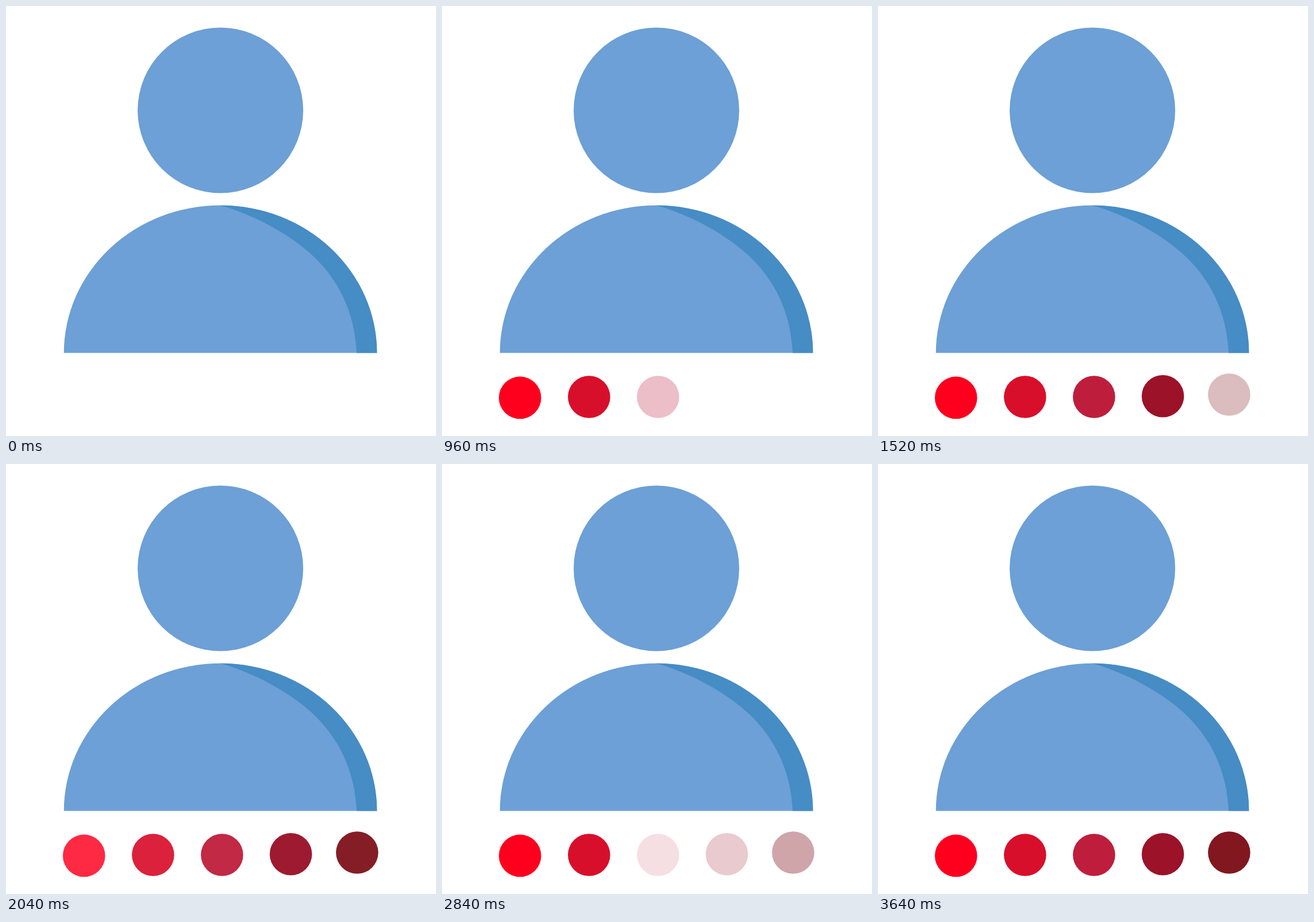
An HTML page with a canvas for the animation above (4000 ms loop, 748 by 748 pixels).

```html
<!DOCTYPE html>
<html lang="en">
<head>
<meta charset="utf-8">
<title>Loading dots</title>
<style>
  html, body { margin: 0; width: 100%; height: 100%; overflow: hidden; background: #fff; }
  canvas { display: block; width: 748px; height: 748px; }
</style>
</head>
<body>
<canvas id="stage" width="748" height="748"></canvas>
<script>
const ctx = document.getElementById('stage').getContext('2d');
const LOOP = 4000, STEP = 40, FADE = 280;
const LIGHT = '#6ca0d6', DARK = '#468cc5';
const dots = [
  { x: 135.7, y: 681.4, color: '#fe001e' },
  { x: 255.8, y: 680, color: '#d80f2b' },
  { x: 375.8, y: 680, color: '#be1e3c' },
  { x: 495.5, y: 678.7, color: '#9b1229' },
  { x: 610.8, y: 676, color: '#821720' }
];

const clamp = v => Math.min(1, Math.max(0, v));

// Dots appear one by one, then each dims until its turn to light up again.
function alphaAt(i, t) {
  if (t <= 2000) return clamp((t - 320 - FADE * i) / FADE);
  const low = 2240 + FADE * i;
  return t < low ? (low - t) / (low - 2000) : clamp((t - low) / FADE);
}

function disc(x, y, r, color) {
  ctx.fillStyle = color;
  ctx.beginPath();
  ctx.arc(x, y, r, 0, Math.PI * 2);
  ctx.fill();
}

function drawPerson() {
  disc(373, 181.5, 144, LIGHT);

  ctx.beginPath();
  ctx.ellipse(373, 603.5, 272.3, 256.7, 0, Math.PI, Math.PI * 2);
  ctx.fill();

  ctx.fillStyle = DARK;
  ctx.beginPath();
  ctx.ellipse(373, 603.5, 272.3, 256.7, 0, -Math.PI / 2, 0);
  ctx.lineTo(610, 603.5);
  ctx.bezierCurveTo(607, 535, 580, 476, 530, 431);
  ctx.bezierCurveTo(490, 395, 430, 363, 373, 346.8);
  ctx.fill();
}

function draw(now) {
  const t = Math.floor((now % LOOP) / STEP + 1e-6) * STEP;
  ctx.fillStyle = '#fff';
  ctx.fillRect(0, 0, 748, 748);
  drawPerson();
  dots.forEach((d, i) => {
    ctx.globalAlpha = alphaAt(i, t);
    disc(d.x, d.y, 36.8, d.color);
  });
  ctx.globalAlpha = 1;
}

let start;
function tick(now) {
  start ??= now;
  draw(Math.max(0, now - start));
  requestAnimationFrame(tick);
}
draw(0);
requestAnimationFrame(tick);
</script>
</body>
</html>
```
